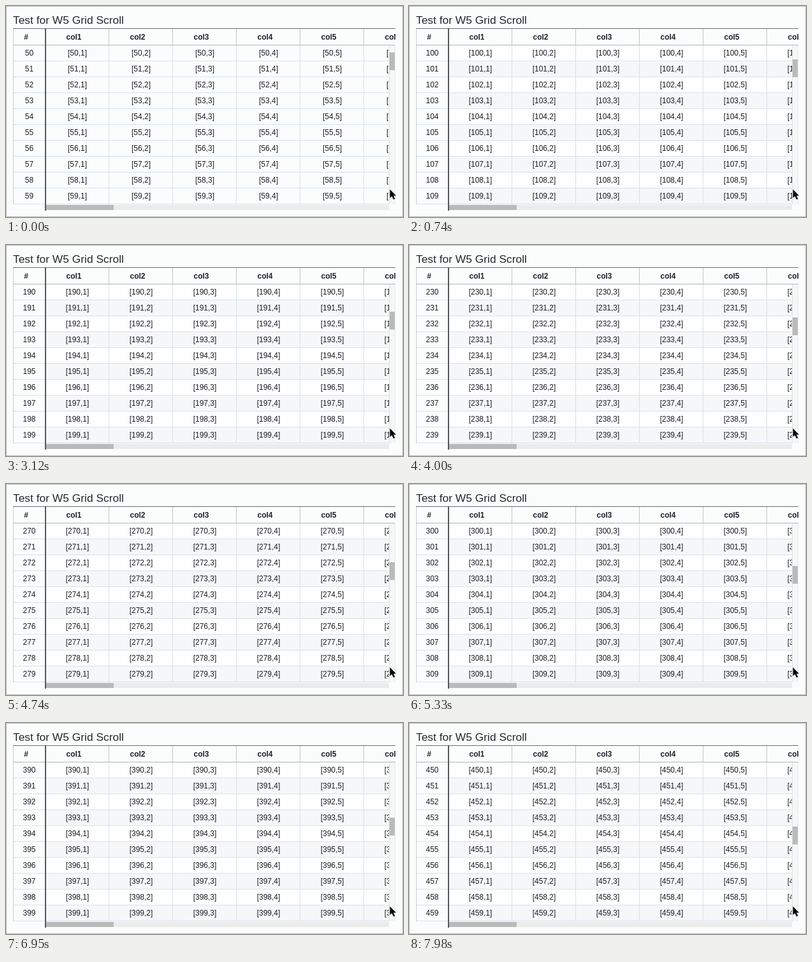
Animation of 623 by 332 pixels, one loop 8 s. Source, as an HTML page:

```html
<!DOCTYPE html>
<html lang="en">
<head>
<meta charset="utf-8">
<title>Grid scroll</title>
<style>
  html, body { margin: 0; width: 100%; height: 100%; overflow: hidden; background: #fbfdfd; }
  svg { display: block; width: 623px; height: 332px; shape-rendering: crispEdges; }
  text { font: 12px "Liberation Sans", Arial, sans-serif; fill: #1d1d22; text-anchor: middle; }
  .title { font-size: 17.4px; text-anchor: start; fill: #26262b; }
  .head { font-weight: bold; fill: #20202c; }
</style>
</head>
<body>
<svg id="stage" viewBox="0 0 623 332">
  <defs>
    <clipPath id="headClip"><rect x="11" y="35" width="600" height="27"/></clipPath>
    <clipPath id="bodyClip"><rect x="11" y="62" width="590" height="250"/></clipPath>
  </defs>
  <rect x=".5" y=".5" width="622" height="331" fill="#fbfdfd" stroke="#b9bbbb"/>
  <text class="title" x="11" y="28">Test for W5 Grid Scroll</text>
  <g id="stripes"></g>
  <g id="lines"></g>
  <g id="head" clip-path="url(#headClip)"></g>
  <g id="cells" clip-path="url(#bodyClip)"></g>
  <g id="bars"></g>
  <path d="M602.5 288.5V302L605.6 299.2L608 304.6L610.4 303.6L608 298.4H612.2Z"
        fill="#000" stroke="#fff" stroke-width="1" paint-order="stroke" shape-rendering="auto"/>
</svg>
<script>
const LOOP = 8000, ROWS = 10, COLS = 6, ROW_H = 25, TOP = 62;
// Moments at which the grid jumps on by one page
const JUMPS = [
  150, 300, 440, 590, 740, 890, 1180, 1330, 1480, 1630, 1780, 2080, 2670, 3120,
  3410, 3700, 3850, 4000, 4300, 4450, 4600, 4740, 4890, 5180, 5330, 5480, 5620,
  5910, 6060, 6200, 6350, 6650, 6800, 6950, 7090, 7240, 7540, 7690, 7830, 7980
];
const $ = id => document.getElementById(id);

function add(parent, tag, attrs, label) {
  const el = document.createElementNS("http://www.w3.org/2000/svg", tag);
  for (const k in attrs) el.setAttribute(k, attrs[k]);
  if (label) el.textContent = label;
  return $(parent).appendChild(el);
}
const rect = (parent, x, y, width, height, fill) =>
  add(parent, "rect", { x, y, width, height, fill });

const cells = [];
for (let r = 0; r < ROWS; r++) {
  const y = TOP + r * ROW_H;
  rect("stripes", 63, y, 538, ROW_H - 1, r % 2 ? "#f5f7f9" : "#fefefe");
  rect("lines", 11, y + ROW_H - 1, 590, 1, "#d6e2ec");
  for (let c = 0; c <= COLS; c++)
    cells.push({ r, c, el: add("cells", "text", { x: c ? 12 + c * 100 : 36.5, y: y + 16 }) });
}

for (let c = 1; c < COLS; c++) {
  rect("lines", 61 + c * 100, 36, 1, 26, "#c3c6c8");
  rect("lines", 61 + c * 100, TOP, 1, 250, "#d9e1e7");
}
rect("lines", 11, 35, 1, 277, "#c9cccd");
rect("lines", 11, 61, 600, 1, "#b3b6b8");
rect("lines", 11, 35, 600, 1, "#6b6d6e");
rect("lines", 61, 35, 2, 287, "#55575a");

for (let c = 0; c <= COLS; c++)
  add("head", "text", { class: "head", x: c ? 6.5 + c * 100 : 31.5, y: 53 }, c ? "col" + c : "#");

rect("bars", 601, TOP, 10, 250, "#f5f6f6");
rect("bars", 601, TOP, 1, 250, "#dfe1e2");
rect("bars", 610, TOP, 1, 250, "#e6e8e8");
rect("bars", 63, 313, 538, 8, "#ebebeb");
rect("bars", 63, 313, 106, 8, "#bababa");
const thumb = rect("bars", 602, 73, 8, 28, "#bababa");

let shown = -1;
function draw(page) {
  const first = 50 + page * ROWS;
  for (const { r, c, el } of cells)
    el.textContent = c ? `[${first + r},${c}]` : first + r;
  thumb.setAttribute("y", Math.round(73.2 + 0.2242 * (first - 50)));
  $("stripes").setAttribute("opacity", page ? 1 : 0);
}

const start = performance.now();
function tick(now) {
  const t = Math.max(0, now - start) % LOOP;
  const page = JUMPS.filter(j => j <= t).length;
  if (page !== shown) draw(shown = page);
  requestAnimationFrame(tick);
}
tick(start);
</script>
</body>
</html>
```
